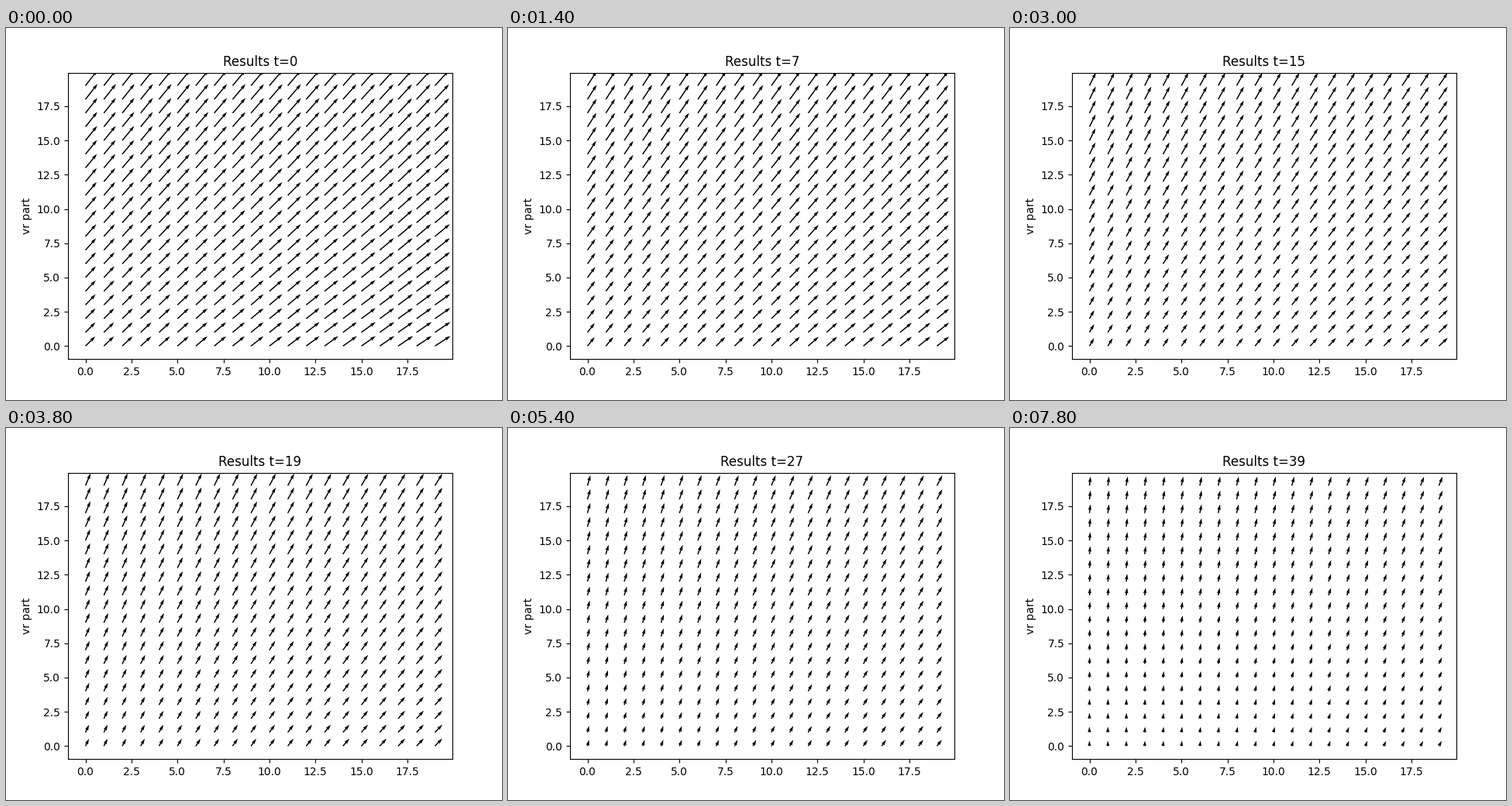
Write a matplotlib script that moves like this. It is 640 by 480 pixels and loops after 8 s.

```python
import numpy as np
import matplotlib.pyplot as plt
from matplotlib.animation import FuncAnimation

N = 20
FRAMES = 40
STEP_MS = 200

X, Y = np.meshgrid(np.arange(N), np.arange(N))


def bilinear(c00, c10, c01, c11):
    """Blend corner values (pixels) over the grid; top corners sit at y=18."""
    a, b = X / 19, Y / 18
    return (1 - b) * ((1 - a) * c00 + a * c10) + b * ((1 - a) * c01 + a * c11)


U_START = bilinear(12.6, 20.0, 15.6, 18.2)
U_END = bilinear(-0.2, 3.6, 1.3, 4.6)
V_START = bilinear(12.4, 13.0, 20.0, 19.4)
V_END = bilinear(7.0, 6.8, 11.6, 11.4)


def field(t):
    s = t / (FRAMES - 1)
    fade = 1 - (1 - s) ** 1.5
    smooth = s * s * (3 - 2 * s)
    swing = 0.3 * fade + 0.7 * smooth
    u = U_START + (U_END - U_START) * fade
    v = V_START + (V_END - V_START) * swing
    return u, v


fig, ax = plt.subplots(figsize=(6.4, 4.8), dpi=100)
arrows = ax.quiver(X, Y, *field(0), scale=1, scale_units="dots")
ax.set_xlim(-0.95, 19.95)
ax.set_ylim(-0.95, 19.95)
ax.set_ylabel("vr part")
title = ax.set_title("Results t=0")


def update(t):
    arrows.set_UVC(*field(t))
    title.set_text(f"Results t={t}")
    return arrows, title


anim = FuncAnimation(fig, update, frames=FRAMES, interval=STEP_MS,
                     repeat=True, repeat_delay=0, blit=False)
plt.show()
```
